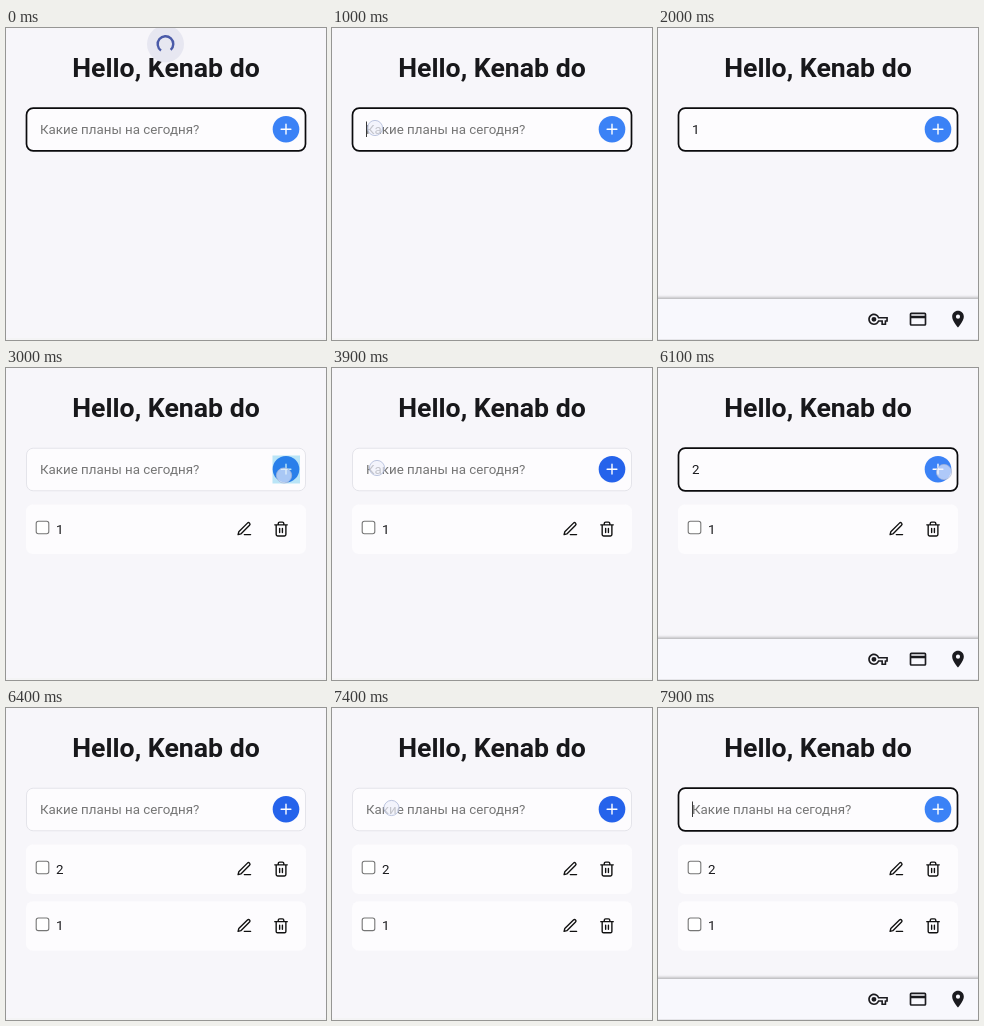
Write an HTML page that moves like this. It is 320 px wide and 312 px high and loops after 8000 ms.

```html
<!DOCTYPE html>
<html lang="ru">
<head>
<meta charset="utf-8">
<title>Планы</title>
<style>
  html, body { margin: 0; width: 100%; height: 100%; overflow: hidden; background: #f7f6fa; }
  svg { display: block; width: 320px; height: 312px; }
  text { font: 13.333px Roboto, sans-serif; fill: #18181b; }
  .title { font-size: 26.667px; font-weight: 700; text-anchor: middle; }
  .line { fill: none; stroke: #111; stroke-width: 2; stroke-linecap: round; stroke-linejoin: round; }
</style>
</head>
<body>
<svg viewBox="0 0 320 312">
  <defs>
    <filter id="soft" x="-20%" y="-20%" width="140%" height="140%"><feGaussianBlur stdDeviation="1.5"/></filter>
    <g id="item">
      <rect x="20" y="136.5" width="280" height="49.5" rx="6.7" fill="#fdfcfe"/>
      <rect x="30.2" y="153.2" width="12.6" height="12.6" rx="2.2" fill="#fff" stroke="#767676" stroke-width="1.1"/>
      <path class="line" transform="translate(230 152.7) scale(.694)"
        d="M12 20h9M16.5 3.5a2.12 2.12 0 0 1 3 3L7 19l-4 1 1-4Z"/>
      <path class="line" transform="translate(266.7 152.7) scale(.694)"
        d="M3 6h18M19 6v14c0 1-1 2-2 2H7c-1 0-2-1-2-2V6M8 6V4c0-1 1-2 2-2h4c1 0 2 1 2 2v2M10 11v6M14 11v6"/>
    </g>
  </defs>

  <rect width="320" height="312" fill="#f7f6fa"/>
  <rect y="310" width="320" height="2" fill="#f4f4f5"/>
  <text class="title" x="160" y="49">Hello, Kenab do</text>

  <rect id="field" x="20.5" y="80.2" width="279" height="42.6" rx="6.7" fill="#fdfcfe"/>
  <text id="entry" x="34" y="105.6"></text>
  <path id="caret" d="M34.5 93.5v15.5" stroke="#222" stroke-width=".9"/>
  <circle id="button" cx="280" cy="101.2" r="13.3"/>
  <path d="M275.1 101.2h9.8M280 96.3v9.8" stroke="#fff" stroke-width="1.4" stroke-linecap="round"/>
  <rect id="highlight" x="266.5" y="87.5" width="27.5" height="28" fill="#33b5e5" opacity=".33"/>

  <g id="first"><use href="#item"/><text id="firstLabel" x="50" y="165.6"></text></g>
  <g id="second" transform="translate(0 56.8)"><use href="#item"/><text x="50" y="165.6">1</text></g>

  <g id="bar">
    <rect x="-10" y="269.5" width="340" height="50" fill="#000" opacity=".28" filter="url(#soft)"/>
    <rect y="271" width="320" height="41" fill="#f8f8fd"/>
    <rect y="311" width="320" height="1" fill="#e6e6ea"/>
    <g fill="#1b1b1f" fill-rule="evenodd">
      <path transform="translate(210.2 281.5) scale(.82)"
        d="M22 19h-6v-4h-2.68c-1.14 2.42-3.6 4-6.32 4-3.86 0-7-3.14-7-7s3.14-7 7-7c2.72 0 5.17 1.58 6.32 4H24v6h-2v4zm-4-2h2v-4h2v-2H11.94l-.23-.67C11.01 8.34 9.11 7 7 7c-2.76 0-5 2.24-5 5s2.24 5 5 5c2.11 0 4.01-1.34 4.71-3.33l.23-.67H18v4zM7 15a3 3 0 1 1 0-6 3 3 0 0 1 0 6z"/>
      <path transform="translate(250 281.2) scale(.833)"
        d="M4 4h16a2 2 0 0 1 2 2v12a2 2 0 0 1-2 2H4a2 2 0 0 1-2-2V6a2 2 0 0 1 2-2zM4 6v2h16V6zM4 11v7h16v-7z"/>
      <path transform="translate(290 281.2) scale(.833)"
        d="M12 2C8.13 2 5 5.13 5 9c0 5.25 7 13 7 13s7-7.75 7-13c0-3.87-3.13-7-7-7zm0 9.5a2.5 2.5 0 1 1 0-5 2.5 2.5 0 0 1 0 5z"/>
    </g>
  </g>

  <circle id="touch" r="7.6" fill="#eef0fb" fill-opacity=".65" stroke="#a9b4d6" stroke-opacity=".75" stroke-width="1"/>

  <g id="spinner">
    <circle r="18.5" fill="#e7e7f1"/>
    <path id="arc" d="M-4.5 6.4A7.8 7.8 0 1 1 5.2 5.8" fill="none" stroke="#4a5aa8" stroke-width="2.4"/>
  </g>
</svg>
<script>
const LOOP = 8000, STEP = 100;
const el = Object.fromEntries([...document.querySelectorAll('svg [id]')].map(node => [node.id, node]));
const clamp = x => Math.min(1, Math.max(0, x));
const easeOut = x => 1 - (1 - clamp(x)) ** 2;
const show = (node, on) => node.setAttribute('display', on ? 'inline' : 'none');
const set = (node, attrs) => { for (const key in attrs) node.setAttribute(key, attrs[key]); };

// Each session: focus the field, slide the bar in, type a digit, submit it.
const sessions = [
  { focus: 0, slide: 1200, typed: 2000, submit: 3000, digit: '1' },
  { focus: 4000, slide: 4100, typed: 5400, submit: 6200, digit: '2' },
  { focus: 7500, slide: 7500, typed: Infinity, submit: Infinity, digit: '' }
];
const touches = [
  { from: 1000, to: 1300, x: 43, y: 100 },
  { from: 2900, to: 3200, x: 278, y: 107.5 },
  { from: 3800, to: 4100, x: 45, y: 100 },
  { from: 5900, to: 6300, x: 286, y: 104 },
  { from: 7400, to: 7600, x: 59.5, y: 100 }
];

function draw(t) {
  const session = sessions.find(s => t >= s.focus && t < s.submit);
  const typed = session && t >= session.typed;
  const done = sessions.filter(s => t >= s.submit).length;

  set(el.field, session ? { stroke: '#0b0b0d', 'stroke-width': 1.7 } : { stroke: '#e4e4ea', 'stroke-width': 1 });
  el.entry.textContent = typed ? session.digit : 'Какие планы на сегодня?';
  el.entry.style.fill = typed ? '#18181b' : '#757575';
  show(el.caret, session && !typed && t >= 600);
  set(el.button, { fill: session ? '#3b82f6' : '#2563eb' });
  show(el.highlight, sessions.some(s => t >= s.submit && t < s.submit + 200));

  show(el.first, done > 0);
  show(el.second, done > 1);
  el.firstLabel.textContent = done;

  const rise = session ? easeOut((t - session.slide) / 400) : 0;
  show(el.bar, rise > 0);
  set(el.bar, { transform: `translate(0 ${46 * (1 - rise)})` });

  const touch = touches.find(p => t >= p.from && t < p.to);
  show(el.touch, touch);
  if (touch) set(el.touch, { cx: touch.x, cy: touch.y });

  const size = 1 - clamp((t - 500) / 300);
  show(el.spinner, size > 0);
  set(el.spinner, { transform: `translate(159.5 16) scale(${size})` });
  set(el.arc, { transform: `rotate(${t * 0.45})` });
}

function tick() {
  draw(Math.floor(performance.now() % LOOP / STEP) * STEP);
  requestAnimationFrame(tick);
}
tick();
</script>
</body>
</html>
```
